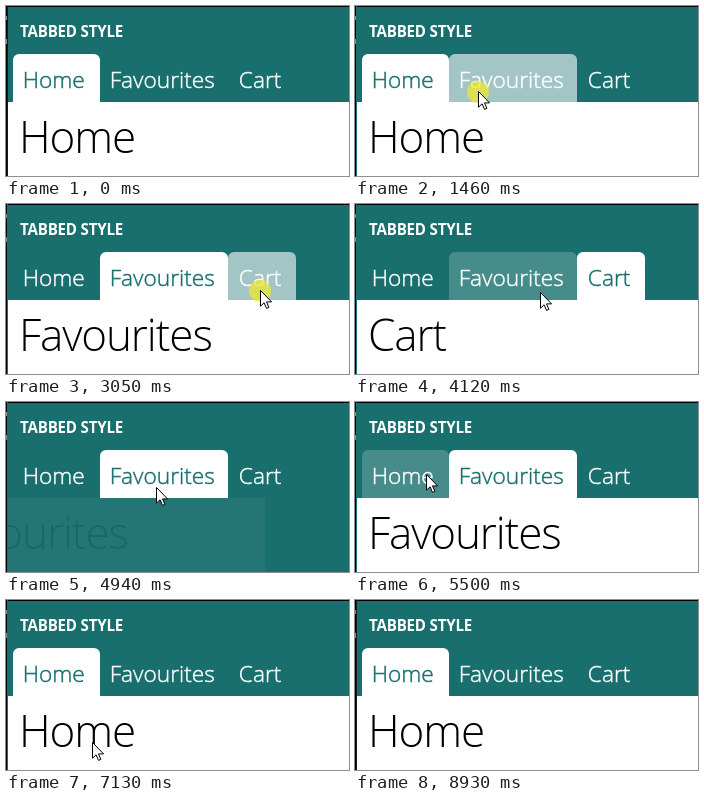
These frames come from a looping animation (343 px wide and 170 px high, 9090 ms). An HTML page:

```html
<!DOCTYPE html>
<html lang="en">
<head>
<meta charset="utf-8">
<title>Tabbed style</title>
<style>
  html, body { margin: 0; width: 100%; height: 100%; overflow: hidden; background: #186f6e; }
  svg { display: block; width: 100vw; height: 100vh; }
  text { font-family: "Open Sans", "Noto Sans", sans-serif; font-weight: 300; }
  .title { font-size: 15.1px; font-weight: 700; letter-spacing: -.2px; fill: #fff; }
  .tab text { font-size: 22.7px; stroke-width: .45px; }
  .page text { font-size: 44px; letter-spacing: -1.1px; fill: #000; }
</style>
</head>
<body>
<svg id="stage" viewBox="0 0 343 170">
  <defs><clipPath id="body"><rect x="2" y="96" width="341" height="74"/></clipPath></defs>
  <rect width="343" height="170" fill="#186f6e"/>
  <text class="title" x="14" y="31">TABBED STYLE</text>
  <g id="tabs"></g>
  <g clip-path="url(#body)"><g id="page" class="page">
    <rect x="2" y="96" width="341" height="74" fill="#fff"/>
    <text id="heading" x="13" y="146.5"></text>
  </g></g>
  <path d="M0 0H343V1H1V170H0Z" fill="#000"/>
  <rect id="edge" x="1" y="0" width="1" height="170"/>
  <path d="M0 10h1v4h-1zM0 33h1v5h-1z" fill="#8a8a8a"/>
  <circle id="press" r="11" fill="#efe52c" fill-opacity=".75"/>
  <path id="cursor" d="M.5 .5V16.2L4.1 12.8L6.5 18.4L8.9 17.4L6.5 11.9H11.6Z"
        fill="#fff" stroke="#000" stroke-width="1" stroke-linejoin="round"/>
</svg>
<script>
const LOOP = 9090, HOLD = 130, EXIT = 90, ENTER_AT = 250, ENTER = 610, SLIDE = 100;
const TEAL = '#186f6e';
const NS = 'http://www.w3.org/2000/svg';
const $ = id => document.getElementById(id);

const tabs = [
  { name: 'Home', x: 7, end: 94, text: 16.7 },
  { name: 'Favourites', x: 94, end: 222, text: 103.7 },
  { name: 'Cart', x: 222, end: 290, text: 232.8 }
];
// Each click: time, tab left, tab chosen
const clicks = [[1460, 0, 1], [3050, 1, 2], [4680, 2, 1], [6110, 1, 0]];

const ease = {
  lin: p => p,
  in: p => p * p,
  out: p => 1 - (1 - p) ** 2,
  both: p => p * p * (3 - 2 * p)
};
// Pointer path: time, x, y, easing into the point
const path = [
  [290, 102, 171, 'lin'], [1200, 123, 85, 'both'], [1960, 123, 85, 'lin'],
  [2320, 127, 86, 'in'], [2700, 254, 86, 'both'], [3620, 254, 86, 'lin'],
  [3930, 237, 88, 'in'], [4120, 185, 88, 'lin'], [4480, 150, 85, 'out'],
  [4930, 150, 85, 'lin'], [5500, 71, 72, 'both'], [6480, 71, 72, 'lin'],
  [6990, 80, 122, 'in'], [7590, 95, 171, 'out']
];

function add(parent, tag, attrs) {
  const el = document.createElementNS(NS, tag);
  for (const k in attrs) el.setAttribute(k, attrs[k]);
  return parent.appendChild(el);
}

for (const tab of tabs) {
  const g = add($('tabs'), 'g', { class: 'tab' });
  const w = tab.end - tab.x;
  tab.shape = add(g, 'path', {
    d: `M${tab.x} 96v-42a6 6 0 0 1 6-6h${w - 12}a6 6 0 0 1 6 6v42z`, fill: '#fff'
  });
  tab.label = add(g, 'text', { x: tab.text, y: 82 });
  tab.label.textContent = tab.name;
}

const clamp = v => Math.min(1, Math.max(0, v));

function pointer(t) {
  const i = path.findIndex(k => k[0] > t);
  if (i < 1) return null;
  const [t0, x0, y0] = path[i - 1], [t1, x1, y1, kind] = path[i];
  const p = ease[kind]((t - t0) / (t1 - t0));
  return { x: x0 + (x1 - x0) * p, y: y0 + (y1 - y0) * p };
}

function pageState(t) {
  const click = clicks.filter(c => c[0] + HOLD <= t).pop();
  if (!click) return { active: 0, shown: 0, dx: 0, alpha: 1 };
  const [start, from, to] = click;
  const dir = Math.sign(to - from), age = t - start;
  if (age < ENTER_AT) {
    const p = clamp((age - HOLD) / EXIT);
    return { active: to, shown: from, dx: -dir * SLIDE * p * p, alpha: 1 - p };
  }
  const p = clamp((age - ENTER_AT) / ENTER);
  const left = p < 1 ? Math.exp(-9.7 * p) : 0;
  return { active: to, shown: to, dx: dir * SLIDE * left, alpha: clamp((age - ENTER_AT) / 230) };
}

function draw(t) {
  const tip = pointer(t), page = pageState(t);
  const pressed = clicks.some(c => t >= c[0] && t < c[0] + HOLD);

  tabs.forEach((tab, i) => {
    const active = i === page.active;
    const over = tip && tip.x >= tab.x && tip.x < tab.end && tip.y >= 48 && tip.y < 96;
    const ink = active ? TEAL : '#fff';
    tab.shape.setAttribute('fill-opacity', active ? 1 : over ? (pressed ? 0.6 : 0.2) : 0);
    tab.label.setAttribute('fill', ink);
    tab.label.setAttribute('stroke', ink);
  });

  $('heading').textContent = tabs[page.shown].name;
  $('page').setAttribute('transform', `translate(${page.dx.toFixed(2)} 0)`);
  $('page').setAttribute('opacity', page.alpha);
  $('edge').setAttribute('fill', t >= 1460 && t < 8930 ? TEAL : '#1b1b1b');

  $('cursor').style.display = tip ? '' : 'none';
  $('press').style.display = tip && pressed ? '' : 'none';
  if (tip) {
    const x = Math.round(tip.x), y = Math.round(tip.y);
    $('cursor').setAttribute('transform', `translate(${x} ${y})`);
    $('press').setAttribute('cx', x);
    $('press').setAttribute('cy', y + 1);
  }
}

const begin = performance.now();
function frame() {
  draw((performance.now() - begin) % LOOP);
  requestAnimationFrame(frame);
}
frame();
</script>
</body>
</html>
```
